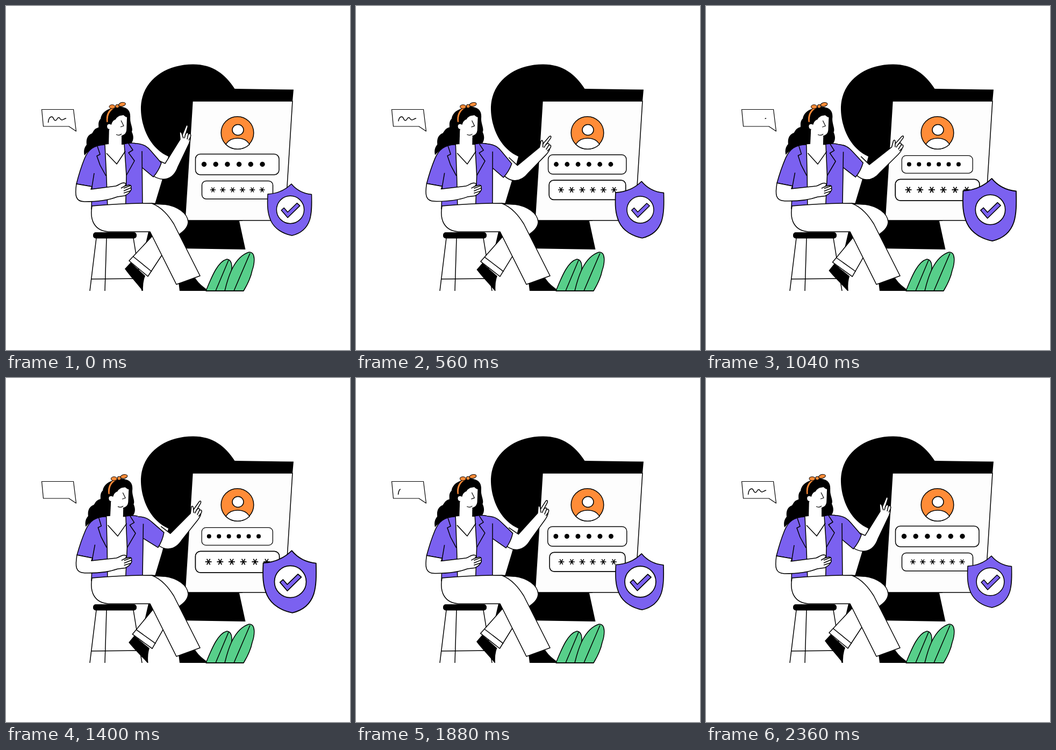
Write an HTML page that moves like this. It is 640 px wide and 640 px high and loops after 2400 ms.

```html
<!DOCTYPE html>
<html lang="en">
<head>
<meta charset="utf-8">
<title>Secure sign-in</title>
<style>
  html, body { margin: 0; width: 100%; height: 100%; overflow: hidden; background: #fff; }
  svg { display: block; width: 100vw; height: 100vh; }
  .white { fill: #fff; }
  .purple { fill: #7b61f0; }
  .orange { fill: #ff8c38; }
  .green { fill: #57cf8a; }
  .black { fill: #000; stroke: none; }
  .line { fill: none; }
  .bare { stroke: none; }
</style>
</head>
<body>
<svg viewBox="0 0 640 640" stroke="#000" stroke-width="1.5" stroke-linejoin="round">
  <!-- keyhole and login panel -->
  <path class="black" d="M302 280C262 262 250 215 251 187C253 140 295 108.500 348 108.500C385 108.500 408 127 425.500 154L535 155.500L533 178H440V400H434L445.500 453L258 450L277 368L290 325Z"/>
  <path fill="#fdfdfd" d="M347 177H533L519 399H333Z"/>
  <circle class="orange" cx="430.5" cy="236" r="30.3"/>
  <path class="white" d="M409 257.500C414 249 422 246 431 246C441 246 449 250 453 257.500C441 269 421 269 409 257.500Z"/>
  <ellipse class="white" cx="431.500" cy="230.500" rx="10.500" ry="10"/>
  <g id="user">
    <rect class="white" x="352.500" y="275.500" width="155.500" height="38.500" rx="9"/>
    <g id="dots" class="black"></g>
  </g>
  <g id="password">
    <rect class="white" x="364.500" y="325.500" width="132" height="33.500" rx="8"/>
    <path id="stars"/>
  </g>
  <path id="shield" class="purple" d="M531 331C520 342 505 349 487 350C486 370 486 385 493 400C500 415 516 424 532 427C549 423 560 413 565 398C569 385 569 370 568.500 350.500C553 349 540 342 531 331Z"/>
  <g id="badge">
    <circle class="white" cx="529" cy="379" r="26"/>
    <path class="purple" d="M512 380L517 375.500L524 383.500L541.500 366.500L547 371.500L524 394Z"/>
  </g>

  <!-- speech bubble -->
  <path class="white" stroke-width="1.2" d="M66.500 192.500H125.500L130.500 233L117 224L69.500 224Z"/>
  <path id="scribble" class="line" pathLength="1" d="M78.500 217C79 211 81 206 85 206C89 206 88 213 92 213C95 213 95 207.500 98 207.500C101 207.500 100 212 104 212C107 212 108 209.500 112 209"/>

  <!-- stool -->
  <path class="line" d="M168 432L156 530M187 432L184 530M237 432L253 530M159 508L250 507"/>
  <rect class="black" x="162" y="421" width="81" height="11.500" rx="5"/>

  <!-- rear leg -->
  <path class="white" d="M271 368L295 369C318 372 338 385 339 402C338 414 329 420 318 428L275 410Z"/>
  <clipPath id="floor"><path d="M0 0H640V530H0Z"/></clipPath>
  <g clip-path="url(#floor)"><g id="shin">
    <path class="black" d="M221 489L232 477L259 502Q254 514 255 531C244 517 231 503 221 489Z"/>
    <path class="white" d="M290 409L229 474L264 503L312 430"/>
    <path class="line" d="M236.500 466L271 494"/>
  </g></g>

  <g id="torso">
    <!-- hair and neck -->
    <path class="black" d="M194 191C184 194 177 201 176 210C170 216 173 224 172 226C164 228 163 233 160 237C150 241 149 250 150 258C145 264 144 271 146 278C154 269 162 262 180 260L232 257C238 250 238 242 234 234C237 228 231 219 231 209C232 199 229 192 221 189Z"/>
    <path class="white bare" d="M192 222L191 262H215V236Z"/>

    <!-- pointing arm -->
    <g id="upper">
      <g id="forearm">
        <path class="white" d="M276 284L296 293L324 248L323 236C324 232 327 235 328 240L335 223C337 220 339 222 338 226L334 239C336 234 340 235 339 239C342 235 345 239 343 244C344 248 342 252 340 257L320 299C312 322 292 331 268 312"/>
        <path class="line" d="M334 238L332 246M339 239L337 248M343 244L340 250M328 240L330 246"/>
      </g>
      <path class="purple" d="M239 255.500C258 256 265 264 270 270L289 292Q284 307 274 318L249 297Z"/>
    </g>

    <!-- shirt and jacket -->
    <path class="white bare" d="M182 258L191 257L206 294L222 264L225 374H184Z"/>
    <path class="purple" d="M184 258C163 259 153 267 146 284C140 299 135 315 131 331L160 336L159 378H189L187 320Z"/>
    <path class="purple bare" d="M220 256.500Q234 254 242 256L254 274V376H222.500L224 315Z"/>
    <path class="line" d="M242 256Q234 254 220 256.500L224 315L222.500 376M253 270L254 376"/>
    <path class="line" d="M164 311L160 336M170 261L175 276L169 279L175 296L186 316M228 256L236 268L228 273L239 288L224 315M187 274L206 294L222 270"/>

    <!-- resting arm -->
    <path class="white" d="M131 331C128 352 129 364 146 364Q184 364 207 355L221 353Q229 349 231.500 344Q234 341 232.500 338Q234 333 229 333L221 335Q226 330 219 329C213 329 209 334 204 335L158 341L160 336Z"/>
    <path class="line" d="M221 335L214 339M232 334L219 339M233 338L219 344M231 344L219 348"/>

    <!-- face and headband -->
    <g id="face">
      <path class="white" d="M197 206L226 201L225 229C225 238 219 242 212 242C204 241 198 237 194 230C186 230 185 219 192 219Z"/>
      <path class="white bare" d="M192.500 226L192 240L215 245V236Z"/>
      <path class="line" d="M214 213L219 223L213 225M205 239Q211 242 215 238" stroke-width="1.2"/>
      <path class="black" d="M189 218C186 202 196 187 211 187C224 187 232 197 231 207C232 215 229 221 227 223L226 207C221 207 219 202 214 200C212 206 207 205 204 211C198 213 197 218 196 221Z"/>
      <path class="orange" stroke-width="1" d="M187 217C184 203 190 192 200 188L203 190C194 194 189 203 190 216Z"/>
      <ellipse class="orange" stroke-width="1" cx="197.500" cy="187.300" rx="5.500" ry="3.600"/>
      <ellipse class="orange" stroke-width="1" cx="216" cy="183" rx="6.500" ry="3.500" transform="rotate(-12 216 183)"/>
      <circle class="orange" stroke-width="1" cx="207" cy="186.500" r="3.300"/>
    </g>
  </g>

  <!-- front leg -->
  <path class="black" d="M321 514L352 506Q360 519 378 530H323Z"/>
  <path class="white" d="M160 372Q220 367 271 367C291 375 303 391 312 405L361 502L317 518L268 420H190C166 418 155 400 160 372Z"/>
  <path class="line" d="M271 367L295 369"/>

  <!-- plant -->
  <path class="green" d="M372 530C384 500 395 475 411 471C423 472 421 492 417 504L407 530Z"/>
  <path class="green" d="M407 530C413 505 424 467 452 458C466 457 462 481 458 492C455 508 448 520 442 530Z"/>
  <path class="line" d="M390 530L414 473M424 530L454 460M372 530H442"/>
</svg>
<script>
const LOOP = 2400, STEP = 40;
const el = id => document.getElementById(id);
const clamp = x => Math.min(1, Math.max(0, x));
const wave = (t, start = 0) => (1 - Math.cos(2 * Math.PI * (t - start) / LOOP)) / 2;
const soft = x => (1 - Math.cos(Math.PI * x)) / 2;
const ease = x => x < .5 ? .5 * (2 * x) ** 2.5 : 1 - .5 * (2 - 2 * x) ** 2.5;

// Smooth interpolation through [time, value] keys
function track(t, keys) {
  const i = keys.findIndex(([time]) => time > t);
  if (i < 0) return keys[keys.length - 1][1];
  const [t0, v0] = keys[i - 1], [t1, v1] = keys[i];
  return v0 + (v1 - v0) * soft((t - t0) / (t1 - t0));
}

function rotate(id, angle, x, y) {
  el(id).setAttribute("transform", `rotate(${angle} ${x} ${y})`);
}
function scale(id, s, x, y) {
  el(id).setAttribute("transform", `translate(${x} ${y}) scale(${s}) translate(${-x} ${-y})`);
}

let dots = "", stars = "";
for (let i = 0; i < 6; i++) {
  dots += `<circle cx="${368.5 + 21.7 * i}" cy="294.5" r="4.7"/>`;
  stars += `M${380 + 18.3 * i} 342h10m-7.500 -4.500l5 9m0 -9l-5 9`;
}
el("dots").innerHTML = dots;
el("stars").setAttribute("d", stars);

function draw(t) {
  const sway = wave(t);
  const swap = ease(1 - Math.abs(t / (LOOP / 2) - 1));
  scale("user", 1 - .155 * swap, 430.3, 294.5);
  scale("password", 1 + .19 * swap, 430.4, 342.3);
  scale("shield", 1 + .22 * sway, 528, 379);
  scale("badge", .945 + .2 * wave(t, 360), 529, 379);

  const lean = 1.5 * sway;
  const lift = track(t, [[0, 0], [700, .5], [1480, -10], [2380, 0]]);
  const point = track(t, [[0, 0], [800, 23.5], [1400, 13], [1720, 12], [2380, 0]]);
  rotate("torso", lean, 200, 372);
  rotate("face", -.7 * lean, 205, 250);
  rotate("upper", lift, 250, 272);
  rotate("forearm", point - lift - lean, 291, 306);
  rotate("shin", -3.8 * sway, 275, 374);

  const erased = t < 1400 ? ease(clamp((t - 400) / 800)) : 0;
  const drawn = t < 1400 ? 1 : ease(clamp((t - 1600) / 760));
  el("scribble").setAttribute("stroke-dasharray", `0 ${erased} ${drawn - erased} 2`);
}

function tick() {
  draw(Math.floor(performance.now() % LOOP / STEP) * STEP);
  requestAnimationFrame(tick);
}
tick();
</script>
</body>
</html>
```
